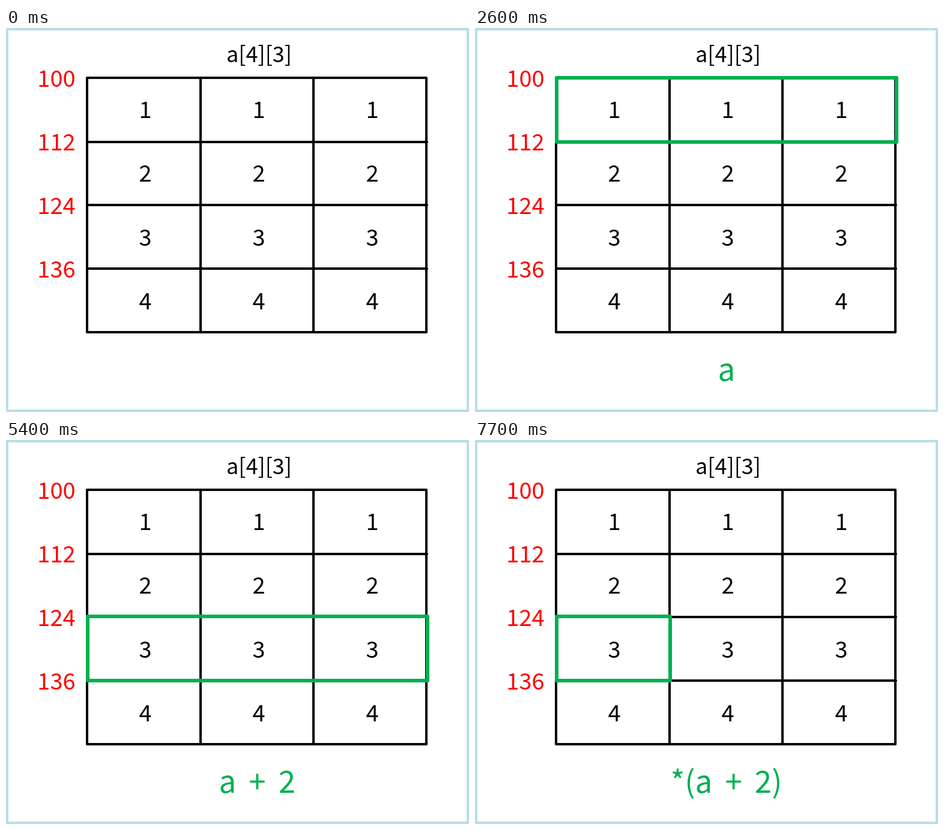
These frames come from a looping animation (771 px wide and 640 px high, 8 s). An HTML page:

```html
<!DOCTYPE html>
<html lang="en">
<head>
<meta charset="utf-8">
<title>Array pointer steps</title>
<style>
  html, body { margin: 0; width: 100%; height: 100%; overflow: hidden; background: #fff; }
  svg { display: block; width: 771px; height: 640px; }
  text { font-family: "Noto Sans CJK KR", "Noto Sans CJK SC", "Noto Sans CJK JP", "Noto Sans", sans-serif; font-kerning: none; }
  .digit { font-size: 38px; text-anchor: middle; }
  .title { font-size: 36px; text-anchor: middle; }
  .address { fill: #f00; }
  .expression { font-size: 51px; fill: #00b050; word-spacing: 9.7px; }
  .grid { fill: none; stroke: #000; stroke-width: 4; stroke-linejoin: round; stroke-linecap: round; }
  .marker { fill: none; stroke: #00b050; stroke-width: 6; stroke-linejoin: round; }
</style>
</head>
<body>
<svg viewBox="0 0 771 640">
  <rect x="2" y="2" width="767" height="636" fill="#fff" stroke="#b7dde8" stroke-width="4"/>
</svg>
<script>
const LOOP = 8000;
const svg = document.querySelector("svg");

function add(tag, attrs, content = "") {
  const el = document.createElementNS("http://www.w3.org/2000/svg", tag);
  for (const [key, value] of Object.entries(attrs)) el.setAttribute(key, value);
  el.textContent = content;
  return svg.appendChild(el);
}

const label = (x, y, content, cls) => add("text", { x, y, class: cls }, content);
const marker = (y, width, height) => add("rect", { x: 136, y, width, height, class: "marker" });

// Shows an element only during the given [start, end] spans in ms.
function showDuring(el, spans) {
  const frames = [{ offset: 0, opacity: 0 }];
  for (const [start, end] of spans) {
    frames.push({ offset: start / LOOP, opacity: 1 });
    if (end < LOOP) frames.push({ offset: end / LOOP, opacity: 0 });
  }
  frames.push({ offset: 1, opacity: frames.at(-1).opacity });
  for (const frame of frames) frame.easing = "steps(1, end)";
  el.animate(frames, { duration: LOOP, iterations: Infinity });
}

// Static table
const rowLines = [190, 295, 401].map(y => `M135 ${y}H701`).join("");
const columnLines = [324, 512].map(x => `M${x} 83V507`).join("");
add("path", { class: "grid", d: `M135 83H700V507H135Z${rowLines}${columnLines}` });

label(421.5, 57, "a[4][3]", "title");
[150, 256, 363, 469].forEach((y, row) => {
  for (const x of [232, 421, 610]) label(x, y, row + 1, "digit");
  label(84, 98 + row * 106, 100 + row * 12, "digit address");
});

// Timed parts
const steps = [
  [label(404.5, 588, "a", "expression"), [[500, 3600]]],
  [label(354.5, 588, "a + 2", "expression"), [[3600, 7200]]],
  [label(325.5, 588, "*(a + 2)", "expression"), [[7200, LOOP]]],
  [marker(83, 566, 107), [[1000, 1500], [1800, 2300], [2600, 3600]]],
  [marker(190, 566, 107), [[4100, 4600]]],
  [marker(294, 566, 107), [[4600, 5100], [5400, 5900], [6200, 7200]]],
  [marker(294, 189, 107), [[7700, LOOP]]],
];
for (const [el, spans] of steps) showDuring(el, spans);
</script>
</body>
</html>
```
